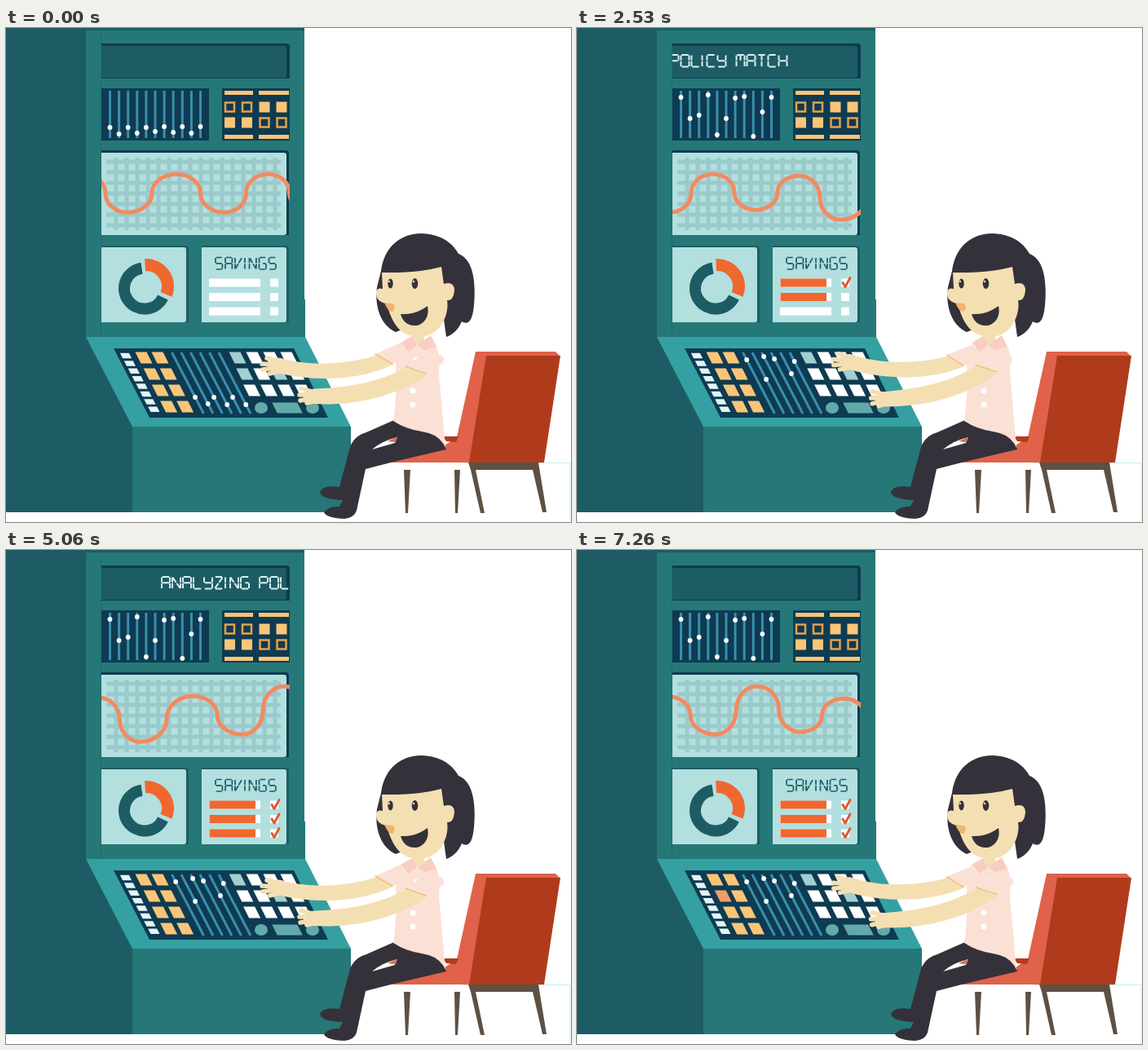
Write an HTML page that moves like this. It is 693 by 606 pixels and loops after 7370 ms.

```html
<!DOCTYPE html>
<html lang="en">
<head>
<meta charset="utf-8">
<title>Analyzing policy match</title>
<style>
html, body { margin: 0; width: 100%; height: 100%; overflow: hidden; background: #fff; }
svg { display: block; width: 693px; height: 606px; }
.deep { fill: #1d5c64; } .body { fill: #257877; } .navy { fill: #0e3b52; }
.screen { fill: #b3dfdf; } .gold { fill: #fbc577; } .white { fill: #fff; }
.ink { fill: #35313a; } .skin { fill: #f4dfb3; } .pink { fill: #fbe0d6; }
.red { fill: #af3b1c; } .coral { fill: #e0624a; } .wood { fill: #5e5043; }
.orange { fill: #f0672f; }
.line { fill: none; stroke-linecap: round; stroke-linejoin: round; }
.ring { fill: none; }
.finger { stroke: #f4dfb3; stroke-width: 5.5; }
.lcd { fill: none; }
</style>
</head>
<body>
<svg viewBox="0 0 693 606">
  <defs>
    <clipPath id="panel"><path d="M117 19H348V254H117Z"/></clipPath>
    <linearGradient id="fade"><stop stop-color="#f0672f"/><stop offset="1" stop-color="#fff"/></linearGradient>
  </defs>

  <!-- cabinet -->
  <path class="deep" d="M0 0H366V379L155 489V594H0Z"/>
  <path class="body" d="M98 3H366V333H367V380H98Z"/>
  <path d="M116.5 6V378" stroke="#206c6d"/>
  <path class="navy" d="M117 19H344Q348 19 348 23V62H117Z"/>
  <path class="deep" d="M117 22H341Q344 22 344 25V58Q344 61 341 61H117Z"/>
  <path class="navy" d="M117 74H249V138H117ZM265 74H348V138H265Z"/>
  <path class="navy" d="M117 150H343Q347 150 347 154V254H117Z"/>
  <path class="screen" d="M117 153H341Q344 153 344 156V251Q344 254 341 254H117Z"/>
  <path id="grid" stroke="#9bcaca" stroke-width="5"/>
  <path class="deep" d="M117 267H220Q224 267 224 271V361H117ZM240 267H343Q347 267 347 271V361H240Z"/>
  <path class="screen" d="M117 269H218Q221 269 221 272V358Q221 361 218 361H117ZM240 269H341Q344 269 344 272V358Q344 361 341 361H240Z"/>
  <g id="sliders"></g>
  <g id="tiles"></g>
  <path id="ringDark" class="ring" stroke="#1d5c64" stroke-width="14"/>
  <path id="ringHot" class="ring" stroke="#f0672f" stroke-width="15"/>
  <path id="savings" class="lcd" stroke="#1d5c64" stroke-width="1.7"/>
  <g id="bars"></g>
  <g clip-path="url(#panel)">
    <path id="wave" class="line" stroke="#f38a60" stroke-width="5"/>
    <path id="ticker" class="lcd" stroke="#d9f0f0" stroke-width="2"/>
  </g>

  <!-- console -->
  <path fill="#35a0a1" d="M98 379H367L423 489H155Z"/>
  <path class="body" d="M155 489H423V594H155Z"/>
  <path class="navy" d="M132 393H353L395 478H176Z"/>
  <g id="keys"></g>
  <g id="faders"></g>

  <!-- chair -->
  <path d="M560 533.5H692V605" fill="none" stroke="#c5eff1"/>
  <path class="wood" d="M488 542H496L493 595H490ZM550 542H557L554 595H551ZM567 533H653L663 594H658L646 542H576L587 595H582L570 542Z"/>
  <path class="coral" d="M576 397H674L680 403L590 404L570 533H470L478 504L538 512L553 502Z"/>
  <path class="red" d="M589 402H680L660 533H568ZM536 501H555L552 508L540 507Z"/>

  <!-- legs -->
  <path class="ink" d="M476 481L506 490L533 498L540 517L472 533L441 541L430 592Q427 601 415 602Q393 601 390 594Q396 586 409 587L413 579Q386 578 385 569Q389 560 409 563L422 514Q427 500 442 496Z"/>
  <path class="white" d="M449 517Q460 507 480 502L477 509Z"/>
  <path class="coral" d="M468 507L480 502L477 508Z"/>

  <!-- head -->
  <path class="ink" d="M460 298C464 268 484 252 510 252C534 253 548 264 555 277C571 283 577 306 574 340C572 362 566 364 559 360C555 370 547 377 540 379L536 350L478 373C459 364 452 341 455 318Z"/>
  <path class="skin" d="M497 365H513V384L503 389L498 383Z"/>
  <path class="skin" d="M461 300Q504 301 534 293L537 314Q549 310 550 321Q549 335 541 334C544 351 533 375 514 378C493 381 476 374 467 338Q453 336 454 323Q456 318 462 320Z"/>
  <path fill="#f2b36e" d="M464 337L475 338Q479 343 474 348Q469 349 464 337Z"/>
  <ellipse class="ink" cx="471.500" cy="313.500" rx="3.200" ry="6"/>
  <ellipse class="ink" cx="501.500" cy="313.500" rx="3.800" ry="6.500"/>
  <circle class="skin" cx="470" cy="311" r="1.200"/><circle class="skin" cx="500" cy="311" r="1.300"/>
  <path class="ink" d="M484 351Q502 352 517 341C520 355 512 365 501 365C491 365 486 358 484 351Z"/>

  <!-- arms and blouse -->
  <g id="farArm">
    <path class="skin" d="M336 405C380 417 424 411 456 401L476 412C444 429 390 436 337 424Z"/>
    <ellipse class="skin" cx="334" cy="414" rx="12" ry="9.500"/>
    <path class="line finger" d="M338 410L320 405M336 413L314 412M336 416L315 419M338 420L323 424"/>
    <path class="pink" d="M453 400L484 386L496 400L474 412Z"/>
    <path class="line" stroke="#efbf82" stroke-width="1.500" d="M453 400L474 412"/>
  </g>
  <path class="pink" d="M480 393L526 387Q533 396 531 425L539 515Q532 498 510 495Q490 492 475 482Q480 450 478 410Z"/>
  <path fill="#f9cdc2" d="M484 386L498 378L504 389L494 397ZM504 389L521 377L528 391L514 395Z"/>
  <g class="white"><circle cx="503" cy="407" r="3.500"/><circle cx="502" cy="426" r="3.500"/><circle cx="499" cy="445" r="3.500"/><circle cx="499" cy="462" r="3.500"/></g>
  <circle id="shoulder" class="pink" cy="407" r="6"/>
  <g id="nearArm">
    <path class="skin" d="M372 443C422 441 456 435 491 416L516 426C478 452 428 464 374 461Z"/>
    <ellipse class="skin" cx="376" cy="452" rx="11" ry="9"/>
    <path class="line finger" d="M378 447L362 442M378 450L360 450M376 454L361 457M380 457L369 460"/>
    <path class="pink" d="M490 415L512 400L529 406L515 425Z"/>
    <path class="line" stroke="#efbf82" stroke-width="1.500" d="M490 415L515 424"/>
  </g>
</svg>
<script>
const LOOP = 7370, STEP = 110;
const $ = id => document.getElementById(id);
const set = (el, attrs) => { for (const k in attrs) el.setAttribute(k, attrs[k]); return el; };
const add = (parent, tag, attrs) =>
  parent.appendChild(set(document.createElementNS('http://www.w3.org/2000/svg', tag), attrs));
const clamp = v => Math.max(0, Math.min(1, v));

// Linear interpolation through matching lists of times and values
function track(times, values, t) {
  let i = 0;
  while (i < times.length - 2 && t >= times[i + 1]) i++;
  const p = clamp((t - times[i]) / (times[i + 1] - times[i]));
  return values[i] + (values[i + 1] - values[i]) * p;
}

// Segment lettering on a unit cell
const SEGS = {
  a: [0, 0, 1, 0], b: [1, 0, 1, .5], c: [1, .5, 1, 1], d: [0, 1, 1, 1], e: [0, .5, 0, 1], f: [0, 0, 0, .5],
  g: [0, .5, 1, .5], r: [.5, .5, 1, .5], h: [0, 0, .5, .5], m: [.5, .5, 1, 1], j: [1, 0, .5, .5], k: [.5, .5, 0, 1],
  i: [.5, 0, .5, .5], l: [.5, .5, .5, 1]
};
const GLYPHS = {
  A: 'abcefg', N: 'bcefhm', L: 'def', Y: 'bcdfg', Z: 'adjk', I: 'ef', G: 'acdefr', P: 'abefg',
  O: 'abcdef', C: 'adef', M: 'abcefi', T: 'ail', H: 'bcefg', S: 'acdfg', V: 'efjk', ' ': ''
};
function lettering(text, x, y, w, h, pitch) {
  let d = '';
  for (const ch of text) {
    for (const s of GLYPHS[ch]) {
      const [x1, y1, x2, y2] = SEGS[s];
      const px = p => (x + w * (x1 + (x2 - x1) * p)).toFixed(1);
      const py = p => (y + h * (y1 + (y2 - y1) * p)).toFixed(1);
      d += `M${px(.08)} ${py(.08)}L${px(.92)} ${py(.92)}`;
    }
    x += ch === 'I' ? pitch * .46 : ch === ' ' ? pitch * .77 : pitch;
  }
  return d;
}
set($('ticker'), { d: lettering('ANALYZING POLICY MATCH', 1, 33, 10, 14.5, 13) });
set($('savings'), { d: lettering('SAVINGS', 257, 281.5, 8.4, 14.5, 12) });

let grid = '';
for (let x = 135; x < 338; x += 13) grid += `M${x} 159V248`;
for (let y = 164; y < 246; y += 13) grid += `M123 ${y}H337`;
set($('grid'), { d: grid });

function arc(cx, cy, r, from, to) {
  const pt = a => `${cx + r * Math.cos(a * Math.PI / 180)} ${cy + r * Math.sin(a * Math.PI / 180)}`;
  return `M${pt(from)}A${r} ${r} 0 ${to - from > 180 ? 1 : 0} 1 ${pt(to)}`;
}
set($('ringDark'), { d: arc(170, 319.5, 25, 26, 262) });
set($('ringHot'), { d: arc(172, 317, 26.5, -93, 22) });

// Panel of square lamps
for (const x of [268, 310]) for (const y of [77, 131])
  add($('tiles'), 'rect', { x, y, width: x === 310 ? 37 : 35, height: 5, class: 'gold' });
[274.5, 295.5, 317, 338].forEach((x, i) => [97, 116].forEach((y, j) => {
  const hollow = (i < 2) === (j === 0), s = hollow ? 11 : 13;
  add($('tiles'), 'rect', { x: x - s / 2, y: y - s / 2, width: s, height: s,
    fill: hollow ? 'none' : '#fbc577', stroke: hollow ? '#e8a04a' : 'none', 'stroke-width': 2.5 });
}));

// Upper sliders and console faders: knob heights at each of KNOB_TIMES
const KNOB_TIMES = [0, 770, 1870, 2530];
const SLIDERS = [
  [122, 113, 85, 85], [130, 126, 120, 111], [122, 121, 114, 107], [129, 119, 86, 82], [122, 124, 130, 131], [127, 114, 111, 111],
  [121, 112, 87, 86], [128, 118, 103, 84], [121, 122, 127, 133], [129, 124, 106, 103], [121, 113, 87, 85]
];
const FADERS = [
  [453, 441, 408, 407], [461, 454, 440, 431], [453, 449, 426, 403],
  [462, 450, 411, 406], [453, 447, 426, 424], [462, 419, 409, 409]
];
const sliderX = i => 127.5 + 11.1 * i;
const faderX = (i, y) => 204.5 + 11.5 * i + .52 * (y - 400);
const makeKnobs = (group, list, rail) => {
  list.forEach((_, i) => add(group, 'path', { d: rail(i), stroke: '#398fae', 'stroke-width': 3 }));
  return list.map(() => add(group, 'circle', { r: 2.9, fill: '#fff' }));
};
const sliderKnobs = makeKnobs($('sliders'), SLIDERS, i => `M${sliderX(i)} 77V135`);
const faderKnobs = makeKnobs($('faders'), FADERS, i => `M${faderX(i, 398)} 398L${faderX(i, 473)} 473`);

// Console keys
const key = (x, y, w, h, fill) => add($('keys'), 'path', {
  d: `M${x - w / 2 - h * .25} ${y - h / 2}h${w}l${h * .5} ${h}h${-w}Z`, fill });
for (let i = 0; i < 8; i++) key(147 + i * 4.9, 402 + i * 9.4, 11, 6.5, '#e4f5f5');
const warmKeys = [], coolKeys = [];
for (let r = 0; r < 4; r++) for (let c = 0; c < 2; c++)
  warmKeys.push(key(169 + r * 10.2 + c * 20, 404.5 + r * 20, 14, 14));
for (let r = 0; r < 3; r++) for (let c = 0; c < 4; c++)
  coolKeys.push(key(284 + r * 8.8 + c * 21, 404.5 + r * 20, 14, 14));
for (const cx of [313, 376]) add($('keys'), 'ellipse', { cx, cy: 466, rx: 8, ry: 7, fill: '#62aaa9' });
key(345, 466, 31, 13, '#62aaa9');
const WARM_LIT = [[], [3, 6, 7], [], [3, 6, 7], [2], []];
const COOL_DIM = [[0, 4, 6], [0, 4, 7], [0, 4, 5, 6], [0], [0, 6], [0, 6]];

// Savings rows
const rows = [307.5, 325, 342.5].map((y, i) => {
  const g = $('bars');
  add(g, 'path', { class: 'white', d: `M249 ${y}h63v10h-63ZM324 ${y}h10v10h-10Z` });
  return {
    start: i * 1455,
    fill: add(g, 'rect', { class: 'orange', x: 249.5, y, height: 10 }),
    edge: add(g, 'rect', { fill: 'url(#fade)', y, height: 10 }),
    tick: add(g, 'path', { class: 'line', d: `M326 ${y + 5}L329 ${y + 10}L335 ${y - 1}`, stroke: '#e2552b', 'stroke-width': 2.8 })
  };
});

// Wave: alternating troughs and crests joined by quarter ellipses
const WAVE = [[95, 178], [149, 225], [209, 178], [268, 225], [321, 178], [373.5, 222], [427, 180], [478, 234],
  [542, 178], [602.5, 225], [654, 166], [707, 222], [760, 181], [813, 225]];
let waveD = `M${WAVE[0]}`;
WAVE.slice(1).forEach(([x, y], i) => {
  const [px, py] = WAVE[i], rx = (x - px) / 2, ry = Math.abs(y - py) / 2, down = y > py ? 1 : 0;
  waveD += `A${rx} ${ry} 0 0 ${down} ${px + rx} ${(y + py) / 2}A${rx} ${ry} 0 0 ${1 - down} ${x} ${y}`;
});
set($('wave'), { d: waveD });

const POSE_TIMES = [0, 770, 1870, 3190, 5060, 6380, 7260];
const WAVE_SHIFT = [0, 42.5, 111.5, 197.5, 313, 395.5, 433];
const TAPS = [0, 3, 8, 13, 20, 25, 28.4];
const TICKER_TIMES = [0, 770, 1870, 3190, 3600, 3601, 3940, 5060, 6380, 7260];
const TICKER_X = [361, 250, 92, -105, -166, 365, 364, 190, -15, -152];

function draw(t) {
  set($('ticker'), { transform: `translate(${track(TICKER_TIMES, TICKER_X, t)})` });
  set($('wave'), { transform: `translate(${-track(POSE_TIMES, WAVE_SHIFT, t)} 1.2)` });

  sliderKnobs.forEach((k, i) => set(k, { cx: sliderX(i), cy: track(KNOB_TIMES, SLIDERS[i], t) }));
  faderKnobs.forEach((k, i) => {
    const y = track(KNOB_TIMES, FADERS[i], t);
    set(k, { cx: faderX(i, y), cy: y });
  });

  for (const { start, fill, edge, tick } of rows) {
    const p = clamp((t - start) / 1020), w = 56.5 * p, soft = p < 1 ? Math.min(15, w) : 0;
    set(fill, { width: w - soft });
    set(edge, { x: 249.5 + w - soft, width: soft });
    set(tick, { visibility: t >= start + 1100 ? 'visible' : 'hidden' });
  }

  const beat = Math.floor(t / 440) % 6;
  warmKeys.forEach((k, i) => set(k, { fill: WARM_LIT[beat].includes(i) ? '#f29c68' : '#fbc577' }));
  coolKeys.forEach((k, i) => set(k, { fill: COOL_DIM[beat].includes(i) ? '#a3cfd0' : '#fff' }));

  // Each forearm rocks about its middle, so hand and sleeve move in opposite directions
  const lift = (1 - Math.cos(Math.PI * track(POSE_TIMES, TAPS, t))) / 2;
  set($('farArm'), { transform: `rotate(${5.5 * lift} 430 410)` });
  set($('nearArm'), { transform: `rotate(${-4.8 * lift} 455 435)` });
  set($('shoulder'), { cx: 531 - 6 * lift });
}

function frame() {
  draw(Math.floor(performance.now() % LOOP / STEP) * STEP);
  requestAnimationFrame(frame);
}
frame();
</script>
</body>
</html>
```
